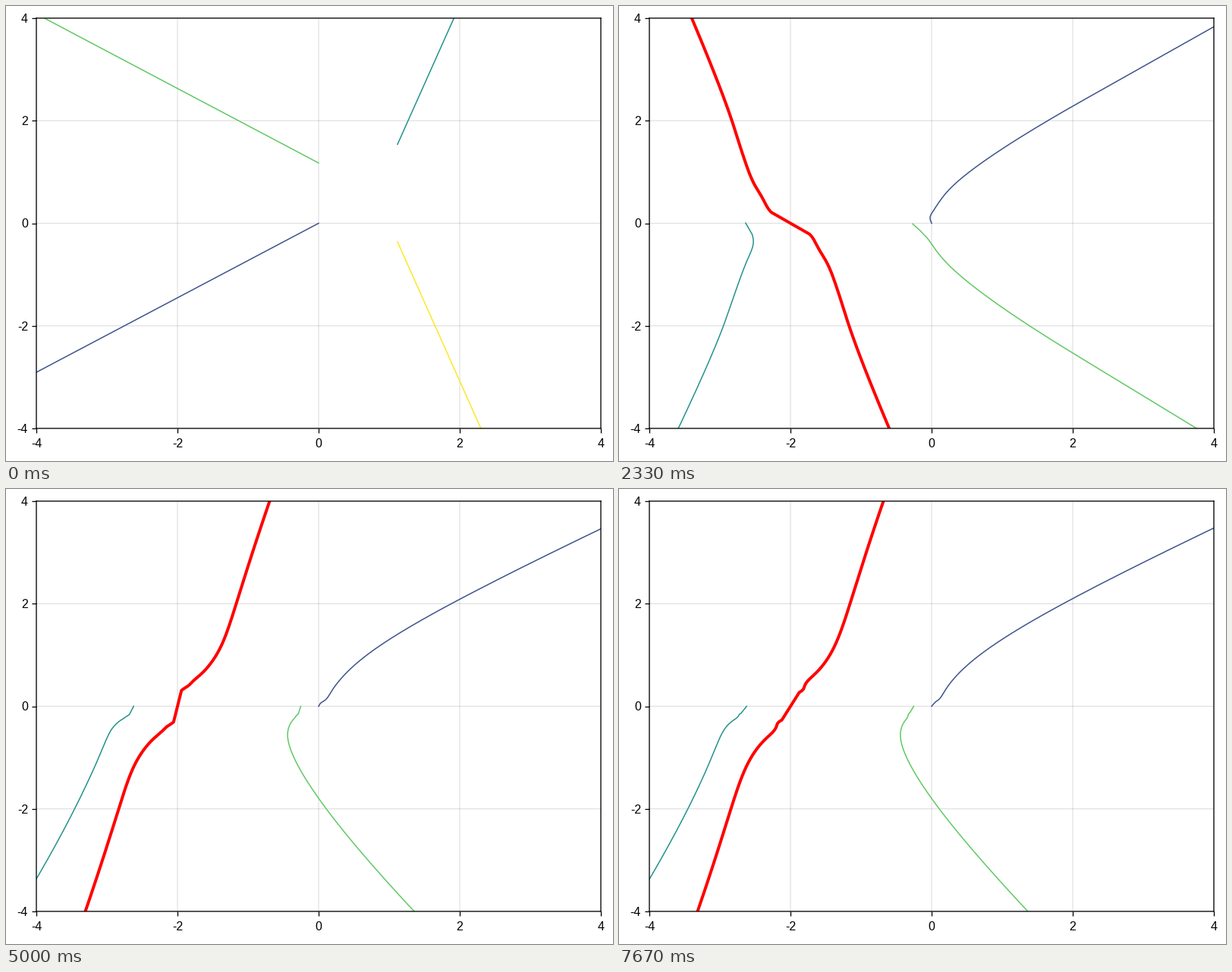
These frames come from a looping animation (800 by 600 pixels, 8 s). A matplotlib script:

```python
import numpy as np
import matplotlib.pyplot as plt
from matplotlib.animation import FuncAnimation

LOOP_MS = 8000
STEPS = 24
TICK_MS = 40
PX = 0.72  # points per pixel at 100 dpi
COLORS = ["#3b528b", "#21918c", "#5ec962", "#fde725"]
ANGLES = [3 / 5, 1 / 5, 2 / 5, 4 / 5]


def initial_legs():
    """Straight rays at the orbit of the angle 3/5, first foot moved to 0."""
    radii = 1 + np.concatenate([[0], np.geomspace(1, 800, 45)])
    units = np.exp(2j * np.pi * np.array(ANGLES))
    return [radii * u - units[0] for u in units]


def path_root(path):
    """Continuous square root along a path."""
    phase = np.unwrap(np.angle(path))
    return np.sqrt(np.abs(path)) * np.exp(0.5j * phase)


def pull_back(leg, lam, side):
    """Lift a leg through z -> lam (1 + z/2)^2, foot on the given side of -2."""
    root = path_root(leg / lam)
    if root[0].real * side < 0:
        root = -root
    return 2 * root - 2


def extend(leg, reach):
    """Continue a leg along its last segment up to about the given radius."""
    length = reach - abs(leg[-1])
    if length <= 0:
        return leg
    step = leg[-1] - leg[-2]
    t = np.linspace(0, 1, 31)[1:] ** 3
    return np.concatenate([leg, leg[-1] + step / abs(step) * length * t])


def iterate(legs, n):
    """One spider step; returns the new legs and the dividing curve."""
    lam = legs[1][0]
    half = 2 * np.concatenate([[0], path_root(legs[0][1:] / lam)])
    tip = half[-1]
    if (tip.imag if n < 8 else tip.real) < 0:
        half = -half
    divider = np.concatenate([-half[:0:-1], half]) - 2
    new = [
        pull_back(legs[1], lam, 1),
        pull_back(legs[2], lam, -1),
        pull_back(legs[3], lam, 1),
        half - 2,
    ]
    reach = 9.3 * 1.33 ** (n - 4)
    return [extend(leg, reach) for leg in new], divider


states = [(initial_legs(), np.array([]))]
for n in range(1, STEPS):
    states.append(iterate(states[-1][0], n))

plt.rcParams["font.family"] = "Liberation Sans"
plt.rcParams["path.snap"] = False
fig = plt.figure(figsize=(8, 6), dpi=100, facecolor="white")
ax = fig.add_axes([40 / 800, 43 / 600, 744 / 800, 541 / 600])
ax.set(xlim=(-4, 4), ylim=(-4, 4))
ticks = range(-4, 5, 2)
names = [str(t) for t in ticks]
ax.set_xticks(ticks, labels=names)
ax.set_yticks(ticks, labels=names)
ax.tick_params(length=6 * PX, width=1.3 * PX, color="black", labelsize=16 * PX)
ax.tick_params(axis="x", pad=6.5 * PX)
ax.tick_params(axis="y", pad=5 * PX)
ax.grid(color="black", alpha=0.12, linewidth=1.2 * PX)
ax.set_axisbelow(True)
for spine in ax.spines.values():
    spine.set(linewidth=1.3 * PX, color="black")

leg_lines = [ax.plot([], [], color=c, lw=1.5 * PX)[0] for c in COLORS]
divider_line, = ax.plot([], [], color="red", lw=4 * PX, solid_capstyle="butt")


def draw(tick):
    # Steps last a third of a second and fall on the nearest earlier tick.
    legs, divider = states[(tick * TICK_MS + 30) * STEPS // LOOP_MS]
    for line, leg in zip(leg_lines, legs):
        line.set_data(leg.real, leg.imag)
    divider_line.set_data(divider.real, divider.imag)
    return [*leg_lines, divider_line]


anim = FuncAnimation(fig, draw, frames=LOOP_MS // TICK_MS, interval=TICK_MS,
                     repeat=True, repeat_delay=0)
plt.show()
```
